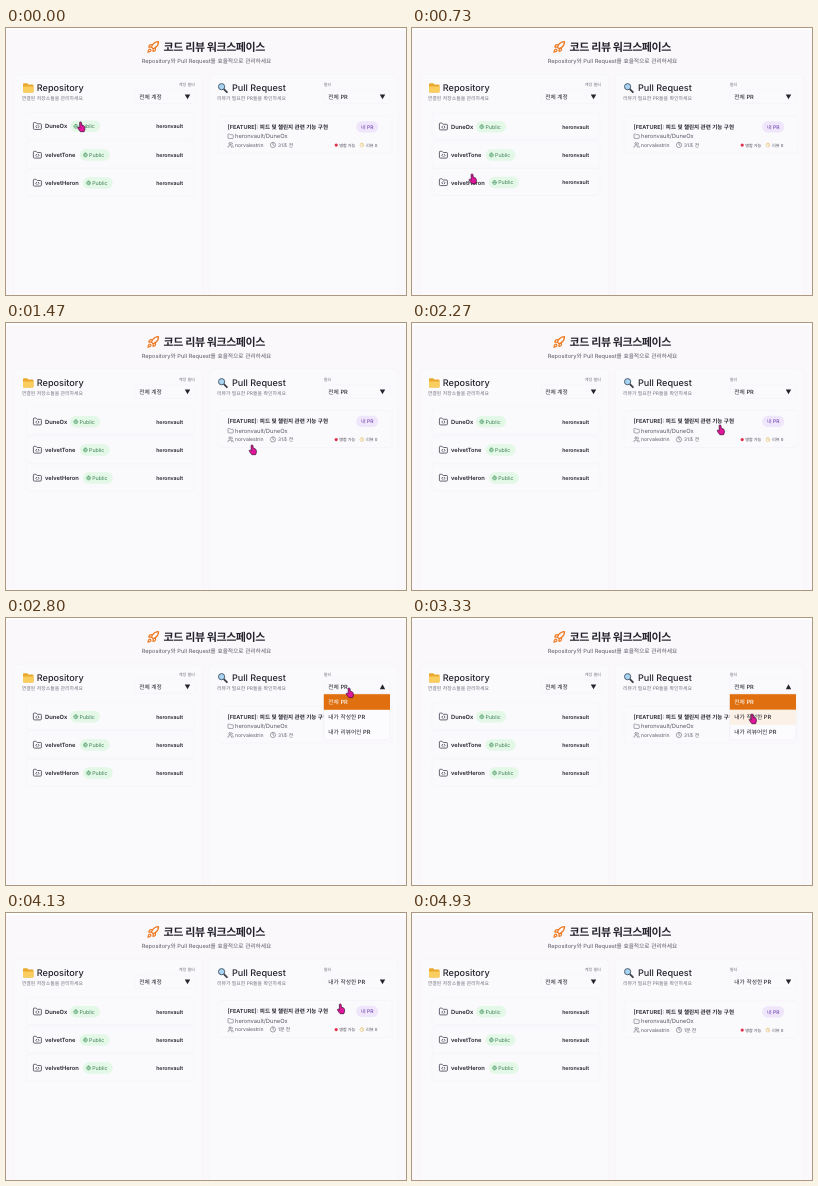
An HTML page for the animation above (5.67 s loop, 400 px wide and 267 px high).

```html
<!DOCTYPE html>
<html lang="ko">
<head>
<meta charset="utf-8">
<title>코드 리뷰</title>
<style>
html, body { margin: 0; width: 100%; height: 100%; overflow: hidden; background: #fff; }
svg { display: block; width: 100vw; height: 100vh; }
text { font-family: Inter, "Noto Sans CJK KR", "Noto Sans CJK", sans-serif; text-rendering: geometricPrecision; white-space: pre; }
.line { fill: none; stroke: currentColor; stroke-linecap: round; stroke-linejoin: round; }
</style>
</head>
<body>
<svg id="stage" viewBox="0 0 400 267"></svg>
<script>
const INK = '#25232d', GREY = '#777482', MID = '#5d5a68', ORANGE = '#e0700f';
const PAGE = '#faf8fb', PANEL = '#faf9fc', EDGE = '#f5f2f7';

const text = (x, y, size, str, { fill = INK, weight = 400, anchor = 'start', spacing = 0, id = '' } = {}) =>
  `<text x="${x}" y="${y}" font-size="${size}" fill="${fill}" font-weight="${weight}" text-anchor="${anchor}" letter-spacing="${spacing}"${id && ` id="${id}"`}>${str}</text>`;

const box = (x, y, w, h, r, fill, stroke = 'none') =>
  `<rect x="${x}" y="${y}" width="${w}" height="${h}" rx="${r}" fill="${fill}" stroke="${stroke}" stroke-width=".6"/>`;

const FOLDER = 'M20 20a2 2 0 0 0 2-2V8a2 2 0 0 0-2-2h-7.9a2 2 0 0 1-1.7-.9L9.6 3.9A2 2 0 0 0 7.9 3H4a2 2 0 0 0-2 2v13a2 2 0 0 0 2 2Z';
const CIRCLE = 'M12 2a10 10 0 1 0 0 20a10 10 0 1 0 0-20';
const ICONS = {
  rocket: 'M4.5 16.5c-1.5 1.3-2 5-2 5s3.7-.5 5-2c.7-.8.7-2.1-.1-2.9a2.2 2.2 0 0 0-2.9-.1z' +
    'M12 15l-3-3a22 22 0 0 1 2-4A12.9 12.9 0 0 1 22 2c0 2.7-.8 7.5-6 11a22 22 0 0 1-4 2z' +
    'M9 12H4s.6-3 2-4c1.6-1 5 0 5 0M12 15v5s3-.6 4-2c1-1.6 0-5 0-5',
  folder: FOLDER,
  code: FOLDER + 'M10 10.5L8 13l2 2.5M14 10.5l2 2.5-2 2.5',
  users: 'M16 21v-2a4 4 0 0 0-4-4H6a4 4 0 0 0-4 4v2M9 3a4 4 0 1 0 0 8a4 4 0 1 0 0-8' +
    'M22 21v-2a4 4 0 0 0-3-3.9M16 3.1a4 4 0 0 1 0 7.8',
  clock: CIRCLE + 'M12 6v6l4 2',
  globe: CIRCLE + 'M2 12h20M12 2c-6 6-6 14 0 20c6-6 6-14 0-20',
};
const icon = (name, x, y, size, color, width = 2) =>
  `<path class="line" d="${ICONS[name]}" transform="translate(${x} ${y}) scale(${size / 24})" style="color:${color};stroke-width:${width}"/>`;

const arrow = (x, y, id) => `<path id="${id}" d="M-2.7-2.4H2.7L0 2.5Z" fill="${INK}" transform="translate(${x} ${y})"/>`;

function repoRow(id, y, name, badgeX) {
  return `<g id="${id}">` +
    box(20, y - 14, 168, 27, 3, PANEL, EDGE) +
    icon('code', 26.6, y - 4.9, 9.6, '#44414e') +
    text(39, y + 2, 5.75, name, { weight: 600 }) +
    box(badgeX, y - 5.7, 30, 11.4, 5.7, '#e3f8e7') +
    icon('globe', badgeX + 3.4, y - 2.4, 4.8, '#3f8f5a', 2.2) +
    text(badgeX + 9.4, y + 1.8, 5.3, 'Public', { fill: '#3f7f56' }) +
    text(177, y + 1.8, 5.2, 'heronvault', { weight: 600, anchor: 'end' }) + '</g>';
}

const header =
  icon('rocket', 140.6, 12.6, 13, '#ee7a22', 2.3) +
  text(157.6, 23.2, 11, '코드 리뷰 워크스페이스', { weight: 700, spacing: -.42 }) +
  text(200.5, 35.3, 5.7, 'Repository와 Pull Request를 효율적으로 관리하세요', { fill: MID, anchor: 'middle' });

const leftPanel =
  box(8, 46, 189, 240, 5, PANEL, EDGE) +
  '<path d="M17 56.2q0-1 1-1h3.2l1.2 1.4h4.1q1 0 1 1v6q0 1-1 1h-8.5q-1 0-1-1z" fill="#e9a92f"/>' +
  '<path d="M17 58.4h10.5v5.2q0 1-1 1h-8.5q-1 0-1-1z" fill="#f9ce5f"/>' +
  text(30.8, 62.6, 9.15, 'Repository', { weight: 500 }) +
  text(15.8, 72.3, 4.9, '연결된 저장소들을 관리하세요', { fill: GREY }) +
  text(172.8, 57.7, 4.1, '계정 필터', { fill: GREY }) +
  box(129, 61.8, 61, 13.6, 3, PANEL, EDGE) +
  text(133.2, 70.7, 5.75, '전체 계정', { weight: 500 }) +
  arrow(181.5, 68.8, 'accountArrow') +
  repoRow('row0', 98.8, 'DuneOx', 64) +
  repoRow('row1', 127, 'velvetTone', 73.6) +
  repoRow('row2', 155, 'velvetHeron', 76.8);

const card = '<g id="card">' +
  box(212, 88, 174, 37, 3, PANEL, EDGE) +
  text(221.6, 100.6, 5.55, '[FEATURE]: 피드 및 챌린지 관련 기능 구현', { weight: 600 }) +
  icon('folder', 221.5, 105.2, 6.3, MID) +
  text(229, 110.4, 5.75, 'heronvault/DuneOx', { fill: MID }) +
  icon('users', 221.5, 113.8, 6.3, MID) +
  text(229, 118.9, 5.1, 'norvalestrin', { fill: MID }) +
  icon('clock', 263.8, 113.8, 6.3, MID) +
  text(272, 118.9, 4.8, '31초 전', { fill: MID, id: 'age' }) +
  box(350.2, 93.2, 22, 11.4, 5.7, '#efe6fc') +
  text(361.2, 100.8, 5, '내 PR', { fill: '#6d43ad', weight: 500, anchor: 'middle' }) +
  '<circle cx="330.2" cy="117.1" r="1.6" fill="#e0304c"/>' +
  text(333.2, 118.7, 4.1, '병합 가능', { weight: 500, fill: '#4a4754' }) +
  icon('clock', 353.6, 114.8, 4.6, '#e3b54a', 2.6) +
  text(360, 118.7, 4.2, '리뷰 0', { weight: 500, fill: MID }) + '</g>';

const rightPanel =
  box(203, 46, 189, 240, 5, PANEL, EDGE) +
  '<path d="M218.1 61.3l2.8 2.9" stroke="#3c4148" stroke-width="1.8" stroke-linecap="round"/>' +
  '<circle cx="215.6" cy="58.7" r="3.1" fill="#a9d4f3" stroke="#4c5f70" stroke-width="1"/>' +
  text(226, 62.6, 9.1, 'Pull Request', { weight: 500 }) +
  text(211, 72.3, 4.9, '리뷰가 필요한 PR들을 확인하세요', { fill: GREY }) +
  text(317.8, 57.7, 4.1, '필터', { fill: GREY }) +
  box(318, 61.8, 66, 13.6, 3, PANEL, EDGE) +
  text(322.3, 70.7, 5.75, '전체 PR', { weight: 500, id: 'filter' }) +
  arrow(376.5, 68.8, 'filterArrow') + card;

const menu = '<g id="menu">' +
  box(317.8, 76, 66.2, 46.2, 1.5, '#fcfbfe', '#eeebf3') +
  box(317.8, 76.2, 66.2, 15.6, 0, ORANGE) +
  '<g id="hover">' + box(318, 91.8, 65.8, 15, 0, '#fbf1e7') + '</g>' +
  text(322.3, 86.2, 5.75, '전체 PR', { fill: '#fff', weight: 500 }) +
  text(322.3, 101.2, 5.75, '내가 작성한 PR', { weight: 500 }) +
  text(322.3, 116.2, 5.75, '내가 리뷰어인 PR', { weight: 500 }) + '</g>';

const hand = '<g id="hand"><path d="M-1.9-4.2q.1-1 1-.9q.8.1.9 1l.3 2.4l1.6.4q1.3.5 1.4 1.7l.1 2.1l-.8 2.2h-3.7' +
  'q-1.4-1.6-2.5-3.4q-.4-1 .3-1.3q.8-.1 1.6.8z" fill="#e0169b" stroke="#3a0d33" stroke-width=".7" stroke-linejoin="round"/></g>';

const $ = id => document.getElementById(id);
$('stage').innerHTML = box(0, 2, 400, 290, 4, PAGE) + header + leftPanel + rightPanel + menu + hand;

// The screen updates 15 times a second; all times below count those ticks.
const LOOP = 5670, TICK = 66.7;
const OPEN = 42, PICK = 52, GONE = 74;
const path = [
  [0, 75.5, 99], [4, 71, 115], [9, 63, 141], [11, 61, 151], [14, 78, 157], [18, 135, 155],
  [22, 247, 127], [26, 303, 108], [31, 303, 108], [34, 309, 107], [39, 344, 75], [42, 344, 75],
  [50, 341, 101], [51, 341, 101], [55, 348, 104], [60, 334, 111], [65, 337, 73.5], [71, 337, 73.5],
  [72, 322, 56], [73, 300, 36], [74, 300, 36],
];

function handAt(tick) {
  const i = Math.max(1, path.findIndex(p => p[0] >= tick));
  const [t0, x0, y0] = path[i - 1], [t1, x1, y1] = path[i];
  const k = (tick - t0) / (t1 - t0);
  return [x0 + (x1 - x0) * k, y0 + (y1 - y0) * k];
}

const show = (id, on) => $(id).setAttribute('visibility', on ? 'visible' : 'hidden');
const lift = (id, on) => $(id).setAttribute('transform', `translate(0 ${on ? -.5 : 0})`);

function draw(ms) {
  const tick = Math.floor((ms % LOOP + 8) / TICK);
  const [x, y] = handAt(Math.min(tick, GONE));
  const open = tick >= OPEN && tick < PICK, picked = tick >= PICK;
  const over = (l, r, mid, half) => x > l && x < r && Math.abs(y - mid) < half;

  $('hand').setAttribute('transform', `translate(${x} ${y})`);
  show('hand', tick < GONE);
  show('menu', open);
  show('hover', open && y > 92);
  [98, 127, 155].forEach((mid, i) => lift('row' + i, over(20, 188, mid, 14)));
  lift('card', !open && over(212, 386, 108, 20));
  $('filter').textContent = picked ? '내가 작성한 PR' : '전체 PR';
  $('age').textContent = picked ? '1분 전' : '31초 전';
  $('filterArrow').setAttribute('transform', `translate(376.5 68.8) scale(1 ${open ? -1 : 1})`);
}

const start = performance.now();
function loop() {
  draw(performance.now() - start);
  requestAnimationFrame(loop);
}
loop();
</script>
</body>
</html>
```
